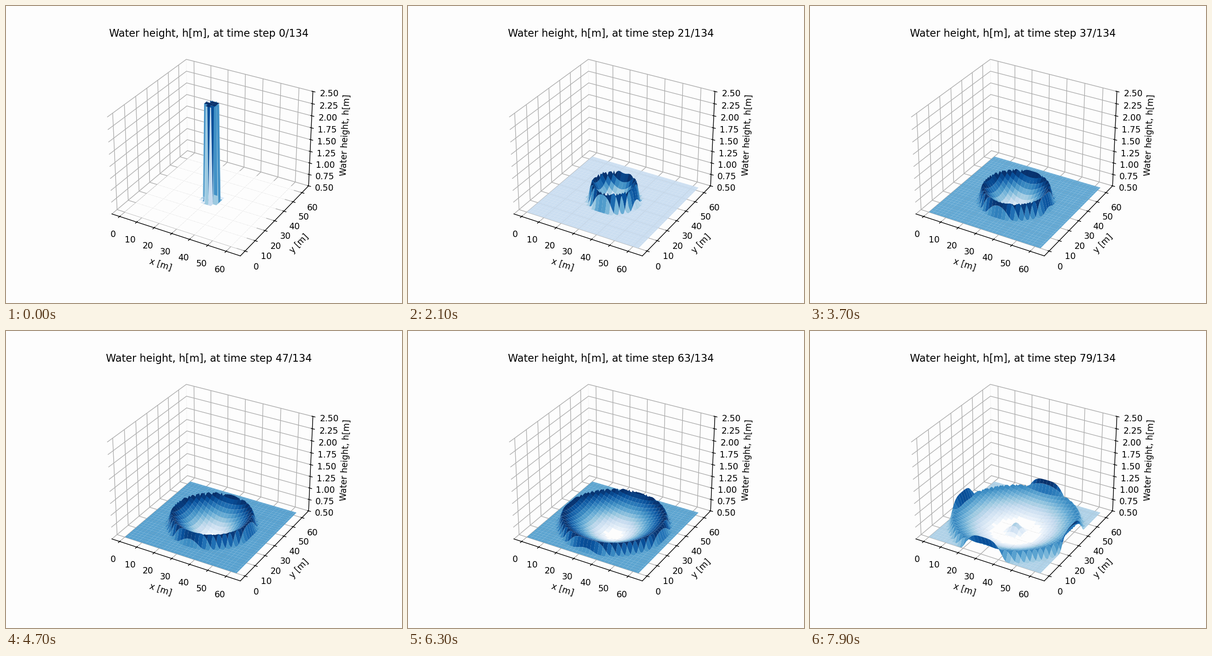
Recreate the animation shown at these times as a matplotlib script. Size 864 px wide and 648 px high, loop 8 s.

```python
import numpy as np
import matplotlib.pyplot as plt
from matplotlib.animation import FuncAnimation
from matplotlib.colors import ListedColormap, to_rgba

N, STEPS, TOTAL = 64, 80, 134
DEPTH, TOP = 0.5, 2.5
COLUMN_R = 4
SPEED = 0.355       # cells per step
FRONT = 2.6         # width of the steep outer face
MID = (N - 1) / 2
BG = "#fdfdfd"

X, Y = np.meshgrid(np.arange(N), np.arange(N))

# Blues, with its palest end faded into the page
shades = plt.get_cmap("Blues")(np.linspace(0, 1, 256))
shades[:10] = to_rgba(BG)
water = ListedColormap(shades)


def ease(t):
    t = np.clip(t, 0, 1)
    return t * t * (3 - 2 * t)


def ripple(cx, cy, n):
    """Height above the still level of a ring spreading from (cx, cy)."""
    r = np.hypot(X - cx, Y - cy)
    rc = 3.4 + SPEED * n
    crest = 1 / (1.1 + 0.136 * rc)

    # the column collapses into a trough, which later flattens and rebounds
    centre = 2.31 * np.exp(-(n / 12) ** 1.6) - 0.31 + 0.15 * ease((n - 56) / 14)
    flat = max(0, 0.48 * (n - 56))
    power = 1.1 + 1.9 * np.exp(-n / 18)
    s = np.clip((r - flat) / (rc - flat), 0, 1)
    inner = centre + (crest - centre) * s ** power
    inner += 0.2 * ease((n - 62) / 17) * np.exp(-(r / 3.3) ** 2)

    u = np.clip((r - rc) / FRONT, 0, 1)
    return np.where(r < rc, inner, crest * (1 - u * u) ** 2)


def height(n):
    if n == 0:
        return np.where(np.hypot(X - MID, Y - MID) < COLUMN_R, TOP, DEPTH)
    # mirrored rings stand in for the reflecting walls
    h = DEPTH + ripple(MID, MID, n)
    for far in (-MID, 3 * MID):
        h += ripple(far, MID, n) + ripple(MID, far, n)
    return h


fig = plt.figure(figsize=(6.4, 4.8), dpi=135, facecolor=BG)
ax = fig.add_subplot(projection="3d", facecolor=BG)
for axis in (ax.xaxis, ax.yaxis, ax.zaxis):
    axis.pane.fill = False
ax.set_xlabel("x [m]")
ax.set_ylabel("y [m]")
ax.set_zlabel("Water height, h[m]")
surface = None


def draw(n):
    global surface
    if surface is not None:
        surface.remove()
    surface = ax.plot_surface(X, Y, height(n), cmap=water)
    ax.set_zlim(DEPTH, TOP)
    ax.set_title(f"Water height, h[m], at time step {n}/{TOTAL}")


anim = FuncAnimation(fig, draw, frames=STEPS, interval=100, repeat=True,
                     repeat_delay=0)
plt.show()
```
